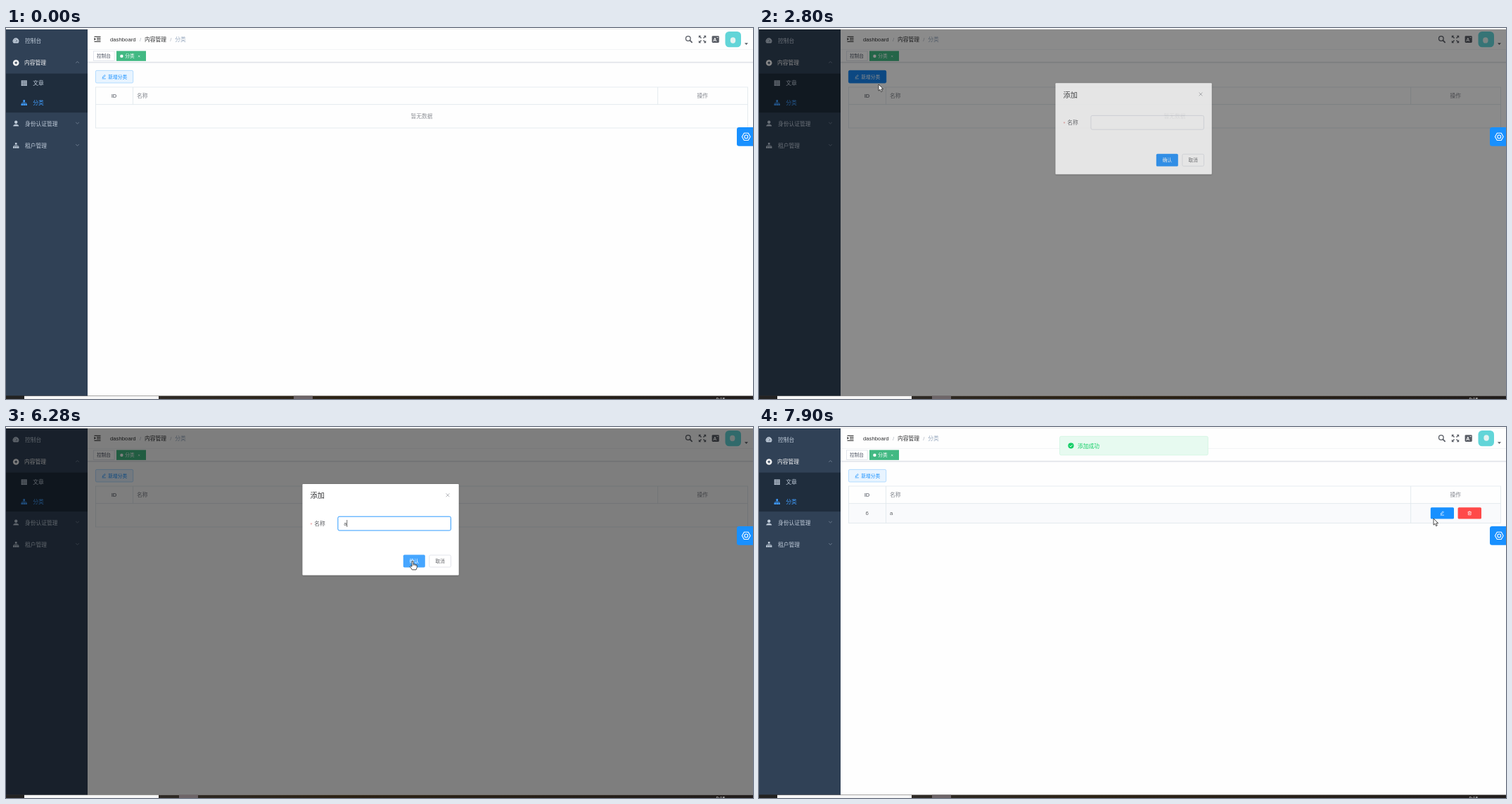
An HTML page for the animation above (8 s loop, 1062 by 527 pixels).

```html
<!DOCTYPE html>
<html lang="en">
<head>
<meta charset="utf-8">
<title>Category admin</title>
<style>
  html, body { margin: 0; width: 100%; height: 100%; overflow: hidden; background: #fefefe; }
  svg { display: block; width: 1062px; height: 527px; }
  text { font-family: "Liberation Sans", "Noto Sans CJK SC", "Noto Sans CJK", sans-serif; white-space: pre; }
</style>
</head>
<body>
<svg id="stage" viewBox="0 0 1062 527" xmlns="http://www.w3.org/2000/svg"></svg>
<script>
const BLUE = '#1890ff', LINE = '#dfe6ec', MENU = '#bfcbd9';

// Markup helpers; text is placed by its vertical centre.
const rect = (x, y, w, h, fill, extra = '') =>
  `<rect x="${x}" y="${y}" width="${w}" height="${h}" fill="${fill}" ${extra}/>`;
const label = (x, cy, str, fill, size = 7.75, extra = '') =>
  `<text x="${x}" y="${cy + size * 0.37}" font-size="${size}" fill="${fill}" ${extra}>${str}</text>`;
const middle = (x, cy, str, fill, size, extra = '') =>
  label(x, cy, str, fill, size, `text-anchor="middle" ${extra}`);
const stroke = (d, color, width = 1, extra = '') =>
  `<path d="${d}" fill="none" stroke="${color}" stroke-width="${width}" ${extra}/>`;
const shape = (d, fill, extra = '') => `<path d="${d}" fill="${fill}" ${extra}/>`;
const at = (x, y, body) => `<g transform="translate(${x} ${y})">${body}</g>`;
const group = (id, body, extra = '') => `<g id="${id}" ${extra}>${body}</g>`;

const cross = (x, y, r, color, w) =>
  stroke(`M${x - r} ${y - r}l${2 * r} ${2 * r}m0 ${-2 * r}l${-2 * r} ${2 * r}`, color, w);
const chevron = (y, dir) =>
  stroke(`M99.2 ${y - dir}l2.3 ${2 * dir}l2.3 ${-2 * dir}`, '#8290a3', 0.7);
const pencil = (x, y, color) => at(x, y,
  stroke('M-2 1.6l.4-1.5L1-2.6l1.1 1.1-2.7 2.7zM-2.6 2.8H2.7', color, 0.7));
const tree = (x, y, color) => at(x, y,
  shape('M-1.3-4h2.6v2.6h-2.6zM-4.2 1.2h2.6v2.6h-2.6zM-1.3 1.2h2.6v2.6h-2.6zM1.6 1.2h2.6v2.6h-2.6z', color) +
  stroke('M0-1.4V1.2M-2.9 1.2V0H2.9V1.2', color, 0.7));

function sidebar() {
  const gauge = at(14, 18.2,
    shape('M-3.2 3.2A4.3 4.3 0 1 1 3.2 3.2z', MENU) +
    stroke('M0 1.8L1.3-1.2M-3.2 .6h1M2.2 .6h1M-2.2-2l.7 .7M0-3v1', '#304156', 0.8));
  const compass = at(14.2, 49.5,
    '<circle r="4.3" fill="#f4f4f5"/>' + shape('M0-2.4L.8-.8 2.4 0 .8 .8 0 2.4-.8 .8-2.4 0-.8-.8z', '#304156'));
  const grid = at(25.7, 78.3,
    rect(-4, -3.8, 8, 7.6, MENU) +
    stroke('M-4-1.5H4M-4 1.2H4M-1.4-3.8V3.8M1.3-3.8V3.8', '#1f2d3d', 0.5));
  const user = at(14.2, 135.5,
    '<circle cy="-1.8" r="2.2" fill="#bfcbd9"/>' + shape('M-4 3.9C-4 .2 4 .2 4 3.9z', MENU));
  return rect(0, 2, 116, 521, '#304156') + rect(0, 64.7, 116, 55.4, '#1f2d3d') +
    gauge + compass + grid + user + tree(25.7, 106.3, '#409eff') + tree(14.2, 167, MENU) +
    label(27, 18, '控制台', MENU) + label(26, 49, '内容管理', '#f4f4f5') +
    label(38.3, 78.5, '文章', MENU) + label(38.3, 106.3, '分类', '#409eff') +
    label(27, 135.7, '身份认证管理', MENU) + label(27, 167, '租户管理', MENU) +
    chevron(48.7, -1) + chevron(135, 1) + chevron(166.3, 1);
}

function navbar() {
  const ink = '#5a5e66';
  const fold = stroke('M125.5 12.3h9M129 14.6h5.5M129 16.9h5.5M125.5 19.3h9', '#222', 1) +
    shape('M125.5 13.8v4l2.3-2z', '#222');
  const search = '<circle cx="969.8" cy="15" r="3.3" fill="none" stroke="#5a5e66" stroke-width="1.3"/>' +
    stroke('M972.2 17.4l3.4 3.4', ink, 1.7);
  const arrow = shape('M5.2 5.2H1.8l1.2-1.2L1 2 2 1l2 2 1.2-1.2z', ink);
  const expand = at(990, 16, [0, 90, 180, 270].map(a => `<g transform="rotate(${a})">${arrow}</g>`).join(''));
  const lang = rect(1003.6, 11.2, 10.2, 9.8, ink, 'rx="1.4"') +
    middle(1007.8, 16.3, 'A', '#fff', 7, 'font-weight="bold"') + stroke('M1010.6 13.5h2', '#fff', 0.8);
  const avatar = rect(1022.5, 5, 22.5, 22.3, '#62d5d8', 'rx="5.5"') +
    '<ellipse id="blob" cx="1033.5" cy="16.5" rx="3.7" ry="4.2" fill="#e4f3f1"/>';
  const slash = '#a9b0bb';
  return fold + label(148, 16, 'dashboard', '#303133') + label(190, 16, '/', slash) +
    label(197, 16, '内容管理', '#303133') + label(233.3, 16, '/', slash) +
    label(240.3, 16, '分类', '#97a8be') +
    search + expand + lang + avatar + shape('M1050 21.3h5l-2.5 2.7z', ink);
}

function tabs() {
  return rect(116, 30, 946, 0.6, '#eceef2') + rect(116, 48.3, 946, 1, '#d3d7df') +
    rect(116, 49.3, 946, 1, '#f0f1f4') +
    rect(124.5, 33, 29.6, 13.6, '#fff', 'stroke="#d8dce5" stroke-width=".7"') +
    label(129, 40, '控制台', '#495060', 6.7) + rect(157, 32.6, 42, 14.3, '#42b983') +
    '<circle cx="164.4" cy="40" r="2.2" fill="#fff"/>' +
    label(169.3, 40, '分类', '#fff', 6.7) + cross(189.2, 40.2, 1.2, '#fff', 0.6);
}

function table() {
  const head = '#80848c', body = '#606266';
  const frame = h => rect(127.4, 84, 927, h, 'none', `stroke="${LINE}" stroke-width=".8"`);
  const columns = h => rect(180, 84, 0.8, h, LINE) + rect(926.3, 84, 0.8, h, LINE);
  const trash = at(1010.2, 122.5, stroke('M-2.6-1.7H2.6M-.9-1.7V-2.6H.9V-1.7M-1.9-1.7V2.4H1.9V-1.7M-.6-.4V1.3M.6-.4V1.3', '#fff', 0.65));
  return group('empty', frame(58) + columns(24.7) + middle(591, 125.6, '暂无数据', '#909399', 7.75)) +
    group('filled',
      rect(127.4, 109, 927, 27.5, '#f9fafc', 'id="rowTint"') + frame(52.5) + columns(52.5) +
      middle(153.6, 122.3, '6', body, 7.75) + label(186, 122.3, 'a', body) +
      rect(954.8, 114.2, 33.2, 16.4, BLUE, 'rx="1.6"') + pencil(971.3, 122.4, '#fff') +
      rect(993.6, 114.2, 33.4, 16.4, '#ff4949', 'rx="1.6"') + trash) +
    rect(127.4, 108.3, 927, 0.8, LINE) +
    middle(153.6, 96.3, 'ID', head, 7.75, 'font-weight="bold"') +
    label(186, 96.3, '名称', head, 7.75, 'font-weight="500"') +
    middle(990.3, 96.3, '操作', head, 7.75, 'font-weight="500"');
}

const addButton = (id, fill, edge, ink) => group(id,
  rect(127.4, 60.4, 53.3, 17.6, fill, `rx="1.7" stroke="${edge}" stroke-width=".8"`) +
  pencil(139.2, 69.2, ink) + label(145.2, 69.3, '新增分类', ink, 6.75));

function dialog() {
  return rect(421.5, 81, 222.2, 129.5, '#fff', 'rx="1" filter="url(#shadow)"') +
    label(432.5, 97.7, '添加', '#303133', 10.2) + cross(628, 96.8, 2.4, '#909399', 0.7) +
    label(432.6, 138, '*', '#e58a8a') + label(438.3, 137.2, '名称', '#606266', 7.75, 'font-weight="500"') +
    rect(471.9, 127.2, 160.5, 19.8, 'none', 'id="field" rx="2" stroke-width=".9"') +
    label(480.2, 137.2, 'a', '#606266', 7.75, 'id="typed"') +
    rect(480.2, 132, 0.7, 10, '#333', 'id="caret"') +
    rect(564.8, 181.6, 31, 17.8, BLUE, 'id="confirm" rx="1.7"') +
    middle(580.3, 190.6, '确认', '#fff', 6.65, 'font-weight="500"') +
    rect(601.8, 182, 30.7, 17, '#fff', 'rx="1.7" stroke="#dcdfe6" stroke-width=".8"') +
    middle(617.2, 190.6, '取消', '#606266', 6.65);
}

function message() {
  return rect(427.5, 13.3, 210.8, 26.6, '#e7faf0', 'rx="2" stroke="#d0f5e0" stroke-width=".8"') +
    '<circle cx="443.5" cy="26.6" r="4.1" fill="#13ce66"/>' +
    stroke('M441.6 26.6l1.4 1.5 2.5-2.7', '#fff', 0.9) + label(453, 26.8, '添加成功', '#13ce66');
}

function settings() {
  const hex = Array.from({ length: 6 }, (_, i) => {
    const a = i * Math.PI / 3;
    return `${(5.9 * Math.cos(a)).toFixed(2)},${(5.9 * Math.sin(a)).toFixed(2)}`;
  }).join(' ');
  return shape('M1062 141h-19.7q-3.3 0-3.3 3.3v20.2q0 3.3 3.3 3.3H1062z', BLUE) +
    at(1052.3, 154.4, `<g fill="none" stroke="#fff" stroke-width="1.1"><polygon points="${hex}" stroke-linejoin="round"/><circle r="2.4"/></g>`);
}

function taskbar() {
  return rect(0, 522.5, 1062, 4.5, 'url(#bar)') + rect(0, 522.5, 26, 4.5, '#222') +
    rect(26, 522.8, 191, 4.2, '#f7f7f7') + rect(409, 522.5, 27, 4.5, '#6d6568', 'id="task"') +
    label(1009.5, 527.6, '9:15', '#ddd', 6.6);
}

function cursors() {
  const ink = 'stroke="#222" stroke-width=".8" stroke-linejoin="round"';
  return group('cursor',
    group('arrow', shape('M0 0V9.2L2.1 7.3 3.6 10.7 5.2 10 3.8 6.7H6.6z', '#fff', ink)) +
    group('ibeam', stroke('M-2.2-5.5Q0-5.5 0-4.5Q0-5.5 2.2-5.5M0-4.5V4.5M-2.2 5.5Q0 5.5 0 4.5Q0 5.5 2.2 5.5', '#222', 0.9)) +
    group('hand', shape('M-1 1Q0-.4 1 1V5Q2.2 4.2 3 5.2Q4.2 4.6 4.8 5.8Q6.3 5.4 6.3 7V9.5L5 12.8H-.6L-3.6 8.3Q-3.2 6.6-1 8.2z', '#fff', ink) +
      stroke('M1 5v2M3 5.4v1.8M4.8 6v1.6', '#222', 0.6)));
}

document.getElementById('stage').innerHTML =
  `<defs>
    <linearGradient id="bar"><stop offset=".2" stop-color="#2e2a26"/><stop offset=".45" stop-color="#2c2214"/><stop offset="1" stop-color="#211d1c"/></linearGradient>
    <filter id="shadow" x="-5%" y="-5%" width="110%" height="115%"><feDropShadow dx="0" dy=".6" stdDeviation=".9" flood-opacity=".3"/></filter>
  </defs>` +
  rect(0, 0, 1062, 527, '#fefefe') + navbar() + tabs() + table() +
  addButton('plain', '#e8f4ff', '#a3d3ff', BLUE) + addButton('solid', '#1684ee', '#1684ee', '#fff') +
  sidebar() + rect(0, 2, 1062, 520.5, '#000', 'id="shade"') + group('dialog', dialog()) +
  group('message', message()) + settings() +
  rect(0, 0, 1062, 2, '#fff') + rect(0, 1, 1062, 0.8, '#e6e6e6') + taskbar() + cursors();

const el = id => document.getElementById(id);
const set = (id, name, value) => el(id).setAttribute(name, value);
const show = (id, on) => set(id, 'display', on ? 'inline' : 'none');

// Event times sit a little before the tick that shows them.
const LOOP = 8000, OPEN = 2770, FOCUS = 3590, TYPE = 5020, SAVE = 6450;

// time, x, y of the pointer
const path = [
  [70, 628, 332], [320, 372, 214], [575, 190, 90], [820, 152, 70], [2585, 152, 70],
  [2770, 170, 80], [3000, 170, 80], [3400, 470, 139], [3600, 504.5, 137], [5030, 504.5, 137],
  [5650, 578, 190], [7290, 578, 190], [7696, 925, 144], [7890, 959, 130]
];
// time, shade, dialog opacity, dialog shift, message opacity, message shift
const fades = [
  [0, 0, 0, 0, 0, 0], [OPEN, 0.455, 0.78, -2.8, 0, 0], [2975, 0.5, 1, 0, 0, 0],
  [SAVE, 0.035, 0.24, -8, 0.7, -13.3], [6655, 0, 0, 0, 1, 0]
];

// The screen refreshes in short, even ticks.
function tick(t) {
  if (t < 70) return 0;
  const [from, step] = t < 950 ? [70, 125.7] : [950, 204.4];
  return from + Math.floor((t - from) / step) * step;
}

function pointAt(t) {
  const i = path.findIndex(p => p[0] > t);
  if (i < 1) return path[i < 0 ? path.length - 1 : 0].slice(1);
  const [a, b] = [path[i - 1], path[i]];
  const k = (t - a[0]) / (b[0] - a[0]);
  return [a[1] + (b[1] - a[1]) * k, a[2] + (b[2] - a[2]) * k];
}

function draw(now) {
  const t = tick(now);
  const [, shade, opacity, shift, note, noteShift] = fades.filter(f => f[0] <= t).pop();
  set('shade', 'opacity', shade);
  set('dialog', 'opacity', opacity);
  set('dialog', 'transform', `translate(0 ${shift})`);
  set('message', 'opacity', note);
  set('message', 'transform', `translate(0 ${noteShift})`);

  const saved = t >= SAVE, focused = t >= FOCUS, typed = t >= TYPE;
  show('empty', !saved);
  show('filled', saved);
  show('solid', t >= 815 && !focused);
  show('typed', typed);
  set('field', 'stroke', focused && !saved ? BLUE : '#dcdfe6');
  set('confirm', 'fill', t >= 5600 ? '#46a6ff' : BLUE);
  const blink = Math.floor((t - (typed ? TYPE : FOCUS)) / 510) % 2 === 0;
  show('caret', focused && !saved && blink);
  set('caret', 'x', typed ? 484.5 : 480.2);

  const [x, y] = pointAt(t);
  const kind = t >= 3390 && t < 5200 ? 'ibeam' : t >= 5600 && t < 6655 ? 'hand' : 'arrow';
  show('cursor', t >= 70);
  set('cursor', 'transform', `translate(${x} ${y})`);
  for (const id of ['arrow', 'ibeam', 'hand']) show(id, id === kind);
  show('rowTint', y < 136.5);

  set('task', 'x', t < 1150 ? 409 : 246);
  set('blob', 'cx', 1033.5 + Math.sin(t / 170));
  set('blob', 'cy', 16.5 + Math.cos(t / 230));
}

const start = performance.now();
function run() {
  draw((performance.now() - start) % LOOP);
  requestAnimationFrame(run);
}
run();
</script>
</body>
</html>
```
